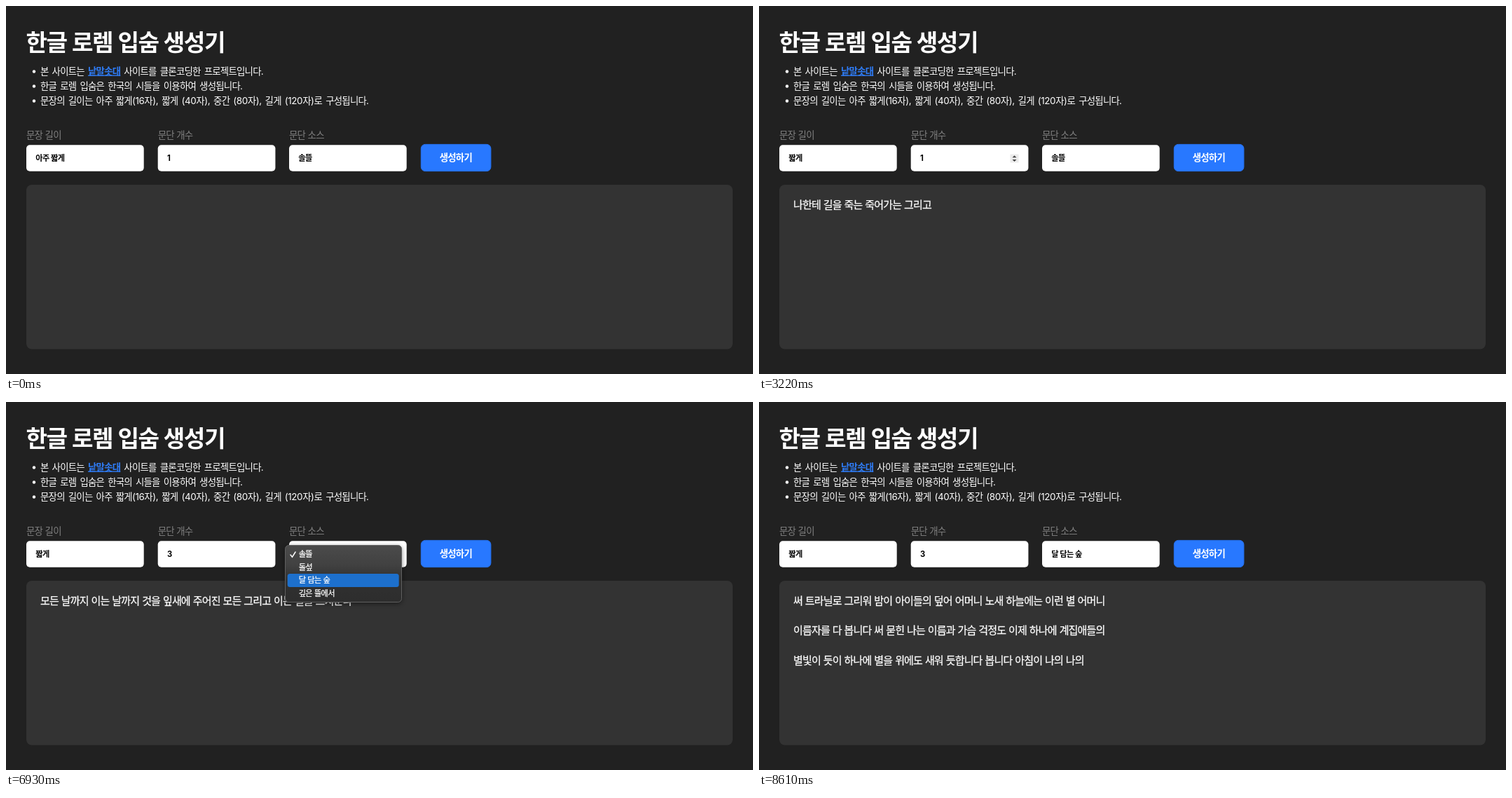
Recreate the animation shown at these times as an HTML page. Size 1066 by 525 pixels, loop 9310 ms.

```html
<!DOCTYPE html>
<html lang="ko">
<head>
<meta charset="utf-8">
<title>한글 로렘 입숨 생성기</title>
<style>
  html, body { margin: 0; width: 100%; height: 100%; overflow: hidden; background: #212121; }
  svg { display: block; }
  text {
    font-family: Inter, "Noto Sans CJK KR", "Noto Sans CJK JP", sans-serif;
    letter-spacing: -.055em; word-spacing: .03em; fill: #fff; white-space: pre;
  }
  .title { font-size: 33.2px; font-weight: 700; letter-spacing: -.045em; }
  .list { font-size: 13.4px; word-spacing: 2px; }
  .count { letter-spacing: -.03em; }
  .link { fill: #2f7cf6; font-weight: 600; text-decoration: underline; }
  .label { font-size: 13.4px; fill: #808080; }
  .value { font-size: 11.2px; font-weight: 700; fill: #000; }
  .button { font-size: 13.4px; font-weight: 700; }
  .body { font-size: 15px; }
  .item { font-size: 11.2px; }
  .body, .item { stroke: #fff; stroke-width: .25px; }
  .popup { filter: drop-shadow(0 2px 3px rgba(0, 0, 0, .45)); }
</style>
</head>
<body>
<svg id="stage" width="1066" height="525" viewBox="0 0 1066 525">
  <defs>
    <linearGradient id="glass" x2="0" y2="1">
      <stop stop-color="#4b4b4b"/>
      <stop offset=".35" stop-color="#414141"/>
      <stop offset=".6" stop-color="#313131"/>
      <stop offset="1" stop-color="#2d2d2d"/>
    </linearGradient>
  </defs>
  <text class="title" x="28.5" y="64">한글 로렘 입숨 생성기</text>
  <g fill="#fff">
    <circle cx="40" cy="93.5" r="2.2"/><circle cx="40" cy="114.5" r="2.2"/><circle cx="40" cy="135.5" r="2.2"/>
  </g>
  <text class="list" x="49" y="97.5">본 사이트는 <tspan class="link">낱말솟대</tspan> 사이트를 클론코딩한 프로젝트입니다.</text>
  <text class="list" x="49" y="118.5">한글 로렘 입숨은 한국의 시들을 이용하여 생성됩니다.</text>
  <text class="list" x="49" y="139.5">문장의 길이는 아주 짧게<tspan class="count">(16자),</tspan> 짧게 <tspan class="count">(40자),</tspan> 중간 <tspan class="count">(80자),</tspan> 길게 <tspan class="count">(120자)</tspan>로 구성됩니다.</text>
  <rect x="29" y="255" width="1008" height="234.5" rx="8" fill="#333"/>
</svg>
<script>
const LOOP = 9310, STEP = 70;
const stage = document.getElementById('stage');

function add(parent, tag, attrs, content = '') {
  const el = document.createElementNS('http://www.w3.org/2000/svg', tag);
  for (const key in attrs) el.setAttribute(key, attrs[key]);
  el.textContent = content;
  return parent.appendChild(el);
}

const label = (cls, x, y, content) => add(stage, 'text', { class: cls, x, y }, content);

function field(x, name) {
  label('label', x, 189, name);
  add(stage, 'rect', { x, y: 198.3, width: 167.7, height: 37.4, rx: 5, fill: '#fff' });
  return label('value', x + 13.3, 221, '');
}

function popup(x, items) {
  const group = add(stage, 'g', { class: 'popup', transform: `translate(${x} 204)` });
  add(group, 'rect', { x: .5, y: .5, width: 166, height: 81, rx: 5, fill: 'url(#glass)', stroke: '#606060' });
  const bar = add(group, 'rect', { x: 3.7, width: 159, height: 18.9, rx: 3.5, fill: '#1d70cd' });
  add(group, 'path', { d: 'M8 14l2.5 3.2L15 10', fill: 'none', stroke: '#fff', 'stroke-width': 1.5, 'stroke-linecap': 'round' });
  items.forEach((item, i) => add(group, 'text', { class: 'item', x: 19.7, y: 17.3 + i * 18.4 }, item));
  return { group, bar };
}

const lengths = ['아주 짧게', '짧게', '중간', '길게'];
const sources = ['솔뜰', '돌섶', '달 담는 숲', '깊은 뜰에서'];
const paragraphs = [
  [0, []],
  [840, ['나한테 길을 죽는 죽어가는 그리고']],
  [3640, ['모든 날까지 이는 날까지 것을 잎새에 주어진 모든 그리고 이는 별을 스치운다']],
  [7980, [
    '써 트라닐로 그리워 밤이 아이들의 덮어 어머니 노새 하늘에는 이런 별 어머니',
    '이름자를 다 봅니다 써 묻힌 나는 이름과 가슴 걱정도 이제 하나에 계집애들의',
    '별빛이 듯이 하나에 별을 위에도 새워 듯합니다 봅니다 아침이 나의 나의'
  ]]
];

const lengthValue = field(29, '문장 길이');
const countValue = field(216.7, '문단 개수');
const sourceValue = field(404, '문단 소스');
const button = add(stage, 'rect', { x: 592.3, y: 197.4, width: 99.6, height: 38.2, rx: 6, stroke: '#2672f2' });
label('button', 618.7, 221, '생성하기');
const lines = [288.7, 331.4, 374].map(y => label('body', 49, y, ''));

const caret = add(stage, 'rect', { x: 236.6, y: 211, width: 1, height: 13, fill: '#000' });
const spinner = add(stage, 'g', { transform: 'translate(358.5 211.5)' });
const halves = [0, 6].map(y => add(spinner, 'rect', { y, width: 12, height: 6 }));
add(spinner, 'path', { d: 'M3 4.8L6 1.8L9 4.8zM3 7.4L6 10.4L9 7.4z', fill: '#444' });

const lengthMenu = popup(23, lengths);
const sourceMenu = popup(398, sources);

const within = (t, ...spans) => spans.some(([from, to]) => t >= from && t < to);
const latest = (t, keys) => keys.filter(([at]) => t >= at).pop()[1];
const show = (el, visible) => el.style.display = visible ? '' : 'none';

// The chosen row blinks once, then the menu fades away.
function drawMenu({ group, bar }, t, open, close, rows) {
  show(group, within(t, [open, close + 350]));
  group.style.opacity = Math.min(1, (close + 350 - t) / 280);
  show(bar, t >= rows[0][0] && !within(t, [close, close + 70]));
  if (t >= rows[0][0]) bar.setAttribute('y', 4.2 + latest(t, rows) * 18.4);
}

function draw(now) {
  const t = Math.floor(now % LOOP / STEP) * STEP;

  lengthValue.textContent = lengths[t < 3010 ? 0 : 1];
  countValue.textContent = latest(t, [[0, 1], [4900, 2], [5600, 3]]);
  sourceValue.textContent = sources[t < 7350 ? 0 : 2];
  const text = latest(t, paragraphs);
  lines.forEach((line, i) => line.textContent = text[i] || '');

  const hovered = within(t, [630, 1330], [3290, 3850], [7630, 8610]);
  button.setAttribute('fill', hovered ? '#25447c' : '#2878ff');

  show(caret, within(t, [4900, 5460], [5600, 6020]));
  show(spinner, within(t, [1400, 1470], [3220, 3290], [4060, 6020]));
  const pressed = within(t, [4900, 4970], [5600, 5670]);
  halves[0].setAttribute('fill', pressed ? '#aaa' : t >= 4550 ? '#c8c8c8' : '#ececec');
  halves[1].setAttribute('fill', within(t, [4340, 4550]) ? '#c8c8c8' : '#ececec');

  drawMenu(lengthMenu, t, 1960, 2870, [[2030, 0], [2310, 1]]);
  drawMenu(sourceMenu, t, 6020, 7210, [[6020, 0], [6230, 1], [6930, 2]]);
}

const start = performance.now();
function tick() {
  draw(performance.now() - start);
  requestAnimationFrame(tick);
}
tick();
</script>
</body>
</html>
```
